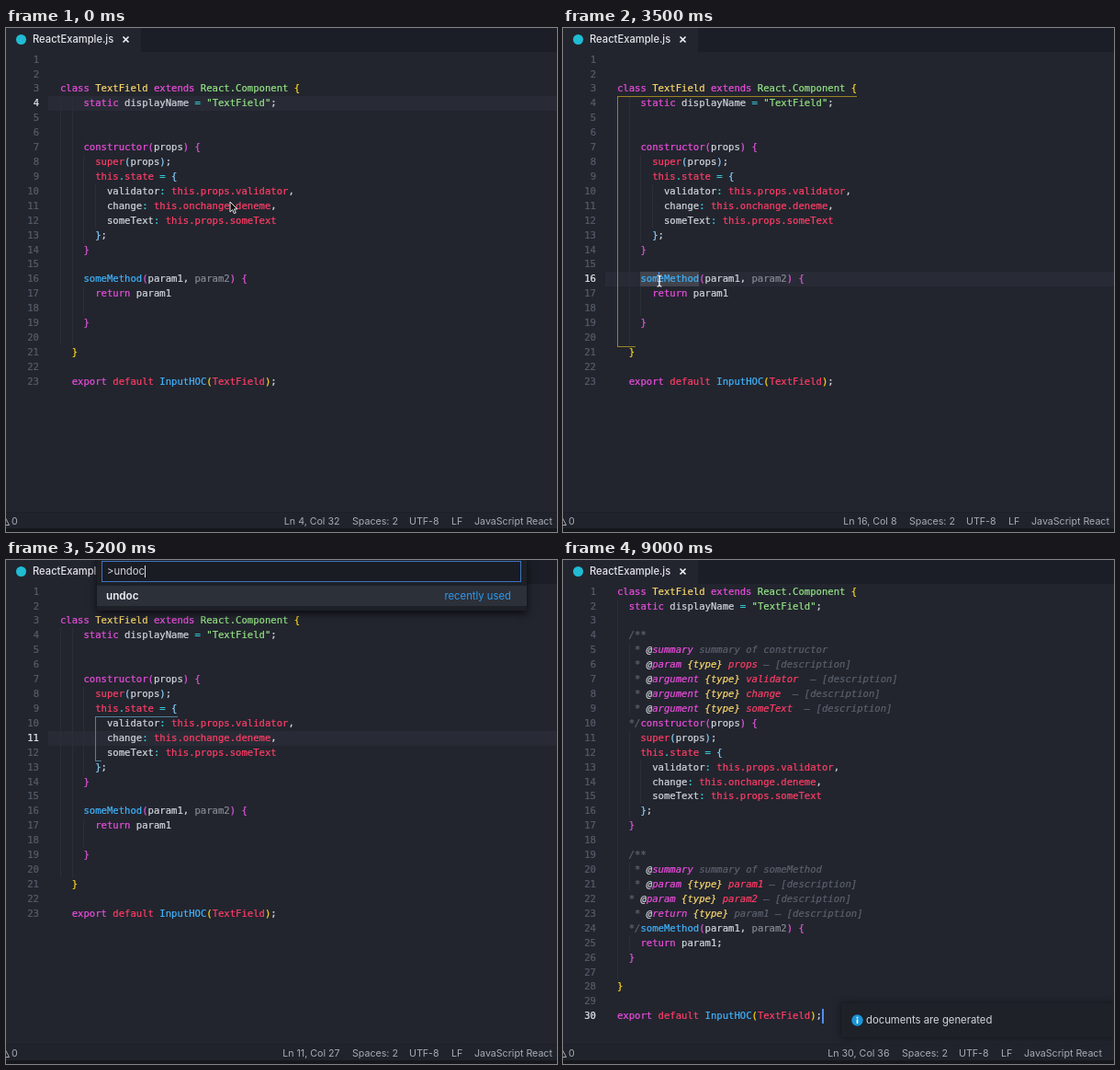
Recreate the animation shown at these times as an HTML page. Size 600 by 548 pixels, loop 9200 ms.

```html
<!DOCTYPE html>
<html lang="en">
<head>
<meta charset="utf-8">
<title>Editor</title>
<style>
html, body { margin: 0; width: 100%; height: 100%; overflow: hidden; background: #22252e; }
#stage { position: absolute; left: 0; top: 0; width: 600px; height: 548px; overflow: hidden; background: #22252e;
  font: 11.3px Inter, Roboto, sans-serif; color: #d3d6dd; }
#stage div, #stage svg, .ui { position: absolute; white-space: pre; }
.ui { top: 0; }
#tabs { left: 0; top: 0; width: 600px; height: 26px; background: #1b1e26; }
#tab { left: 0; top: 0; width: 147px; height: 26px; background: #22252e; font-weight: 500; color: #e4e6ea; }
#tab span { position: absolute; left: 29px; top: 0; line-height: 25px; font-size: 11.2px; }
#logo { left: 11px; top: 7px; width: 11px; height: 11px; border-radius: 50%; background: #20bcd4; }
.page { left: 0; top: 0; width: 600px; height: 526px; }
.row { left: 59px; height: 15.92px; line-height: 15.92px; -webkit-text-stroke: .22px;
  font-family: "DejaVu Sans Mono", "Noto Sans Mono", monospace; font-size: 10.58px; }
.num { right: 100%; margin-right: 23px; color: #565c69; }
.num.on { color: #e6e8ec; }
.guide { width: 1px; background: #2a2e37; }
.m { color: #ea4ddd; } .r { color: #ff3d66; } .b { color: #40b2fb; } .y { color: #f9d66c; }
.g { color: #93e283; } .c { color: #35cfe0; } .w { color: #d0d4dc; } .u { color: #858a95; }
.k, .M, .R, .Y, .W { font-style: italic; }
.k { color: #5b606c; } .M { color: #ea4ddd; } .R { color: #ff3d66; } .Y { color: #f9d66c; } .W { color: #d0d4dc; }
.b1 { color: #ffd71a; } .b2 { color: #e054d8; } .b3 { color: #87cefa; }
.plain .b1, .plain .b2, .plain .b3, .plain .u { color: #d0d4dc; }
#band { left: 46px; width: 554px; height: 16px; background: #282b35; }
.mark { height: 16px; background: #41444d; }
.scope { border: 1px solid; border-right: 0; border-top: 0; box-sizing: border-box; }
.scope i { position: absolute; left: -1px; top: 0; height: 1px; background: currentColor; }
#gold { left: 59px; top: 74px; width: 20px; height: 273px; color: #9a8322; }
#gold i { width: 261px; }
#sky { left: 97px; top: 170px; width: 7px; height: 49px; color: #567f9b; }
#sky i { width: 90px; }
#caret { width: 1.6px; height: 16px; background: #528bff; }
#status { left: 0; top: 526px; width: 600px; height: 18px; background: #20232b; border-top: 1px solid #1d2027;
  box-sizing: border-box; color: #a6abb6; font-size: 10.65px; line-height: 19px; }
#edge { left: 0; top: 544px; width: 600px; height: 4px; background: #15171c; }
#shift { left: 0; top: 0; width: 600px; height: 18px; }
#pos { right: 236.5px; }
#palette { left: 99px; top: -4px; width: 468px; height: 59px; background: #1d2027; box-shadow: 0 3px 8px #0b0c10; }
#field { left: 5px; top: 5px; width: 457px; height: 23px; box-sizing: border-box; border: 1px solid #3e73bd;
  background: #1a1c23; line-height: 21px; padding-left: 5px; }
#field b { display: inline-block; width: 1px; height: 13px; background: #dfe2e8; vertical-align: -2.5px; }
#hit { left: 0; top: 32px; width: 468px; height: 22px; line-height: 22px; background: #2c3039; }
#hit b { position: absolute; left: 10px; font-size: 11.7px; font-weight: 600; color: #eef0f3; }
#hit span { position: absolute; right: 17px; color: #2e9aee; }
#toast { left: 303px; top: 482px; width: 297px; height: 37px; line-height: 37px; background: #1e2128;
  box-shadow: 0 0 7px #101217; }
#toast svg { left: 11px; top: 12px; }
#toast span { left: 27px; }
</style>
</head>
<body>
<div id="stage">
  <div id="band"></div>
  <div id="word" class="mark"></div>
  <div class="page" id="before"></div>
  <div class="page" id="after"></div>
  <div id="gold" class="scope"><i></i></div>
  <div id="sky" class="scope"><i></i></div>
  <div id="caret"></div>
  <div id="tabs"><div id="tab"><div id="logo"></div><span>ReactExample.js</span>
    <svg style="left:126px;top:8px" width="9" height="9"><path d="M1.5 1.5l6 6m0-6l-6 6" stroke="#f0f1f3" stroke-width="1.7"/></svg>
  </div></div>
  <div id="toast">
    <svg width="13" height="13"><circle cx="6.5" cy="6.5" r="6.2" fill="#1a94d8"/><path d="M6.5 5.4v4.6M6.5 2.8v1.6" stroke="#fff" stroke-width="1.6"/></svg>
    <span class="ui">documents are generated</span>
  </div>
  <div id="status">
    <svg style="left:-5px;top:4px" width="10" height="11"><path d="M4 1L8.5 9.5H-1" fill="none" stroke="#a6abb6"/></svg>
    <span class="ui" style="left:6px">0</span>
    <div id="shift">
      <span class="ui" id="pos"></span>
      <span class="ui" style="left:377px">Spaces: 2</span>
      <span class="ui" style="left:439px">UTF-8</span>
      <span class="ui" style="left:485px">LF</span>
      <span class="ui" style="left:510px">JavaScript React</span>
    </div>
  </div>
  <div id="edge"></div>
  <div id="palette"><div id="field"><span id="typed"></span><b></b></div><div id="hit"><b>undoc</b><span>recently used</span></div></div>
  <svg id="arrow" width="11" height="16"><path d="M1 1v11l2.6-2.4 1.8 4.1 1.9-.8-1.8-4h3.4z" fill="#111" stroke="#e8e8e8" stroke-width="1"/></svg>
  <svg id="beam" width="8" height="14"><path d="M1.5 1q2.5 0 2.5 2v8q0 2-2.5 2M6.5 1q-2.5 0-2.5 2v8q0 2 2.5 2M2.5 7.5h3" fill="none" stroke="#eee" stroke-width="1.2"/></svg>
  <svg id="hand" width="12" height="13"><path d="M3 1.5q1-1 1.8.4l.9 2.6 4.2 1q1 .4.8 1.8l-.5 2.4-.8 2h-4.2l-3.4-3.7q-.6-1.3 1-1l1 .6z" fill="#f2f2f2" stroke="#222" stroke-width=".8"/></svg>
</div>
<script>
const $ = id => document.getElementById(id);
const LOOP = 9200, CH = 6.37, LH = 15.92, X0 = 59, Y0 = 26.6;
const colX = c => X0 + c * CH;
const rowY = n => Y0 + (n - 1) * LH;

// "~x" starts a run in colour class x; each line is [indent, runs]
const tail = "~k – [description]";
const tag = (name, type, rest) => `~k* ~W@~M${name} ~Y${type}${rest}`;
const ctor = "~mconstructor~2(~wprops~2) {";
const state = [
  "~rsuper~3(~wprops~3)~w;",
  "~rthis~c.~rstate ~c= ~3{",
  "~wvalidator~c: ~rthis.props.validator~w,",
  "~wchange~c: ~rthis.onchange.deneme~w,",
  "~wsomeText~c: ~rthis.props.someText",
  "~3}~w;"
];
const method = "~bsomeMethod~2(~wparam1, ~uparam2~2) {";
const head = "~mclass ~yTextField ~mextends ~gReact.Component ~1{";
const field = '~mstatic ~wdisplayName ~c= ~g"TextField"~w;';
const foot = "~mexport ~rdefault ~bInputHOC~1(~rTextField~1)~w;";

const before = {
  3: [0, head], 4: [4, field], 7: [4, ctor],
  8: [6, state[0]], 9: [6, state[1]], 10: [8, state[2]], 11: [8, state[3]], 12: [8, state[4]], 13: [6, state[5]],
  14: [4, "~2}"], 16: [4, method], 17: [6, "~mreturn ~wparam1"], 19: [4, "~2}"], 21: [2, "~1}"], 23: [2, foot]
};
const after = {
  1: [0, head], 2: [2, field], 4: [2, "~k/**"],
  5: [3, tag("summary", "", "~ksummary of constructor")],
  6: [3, tag("param", "{type}", " ~Rprops" + tail)],
  7: [3, tag("argument", "{type}", " ~Rvalidator " + tail)],
  8: [3, tag("argument", "{type}", " ~Rchange " + tail)],
  9: [3, tag("argument", "{type}", " ~RsomeText " + tail)],
  10: [2, "~k*/" + ctor],
  11: [4, state[0]], 12: [4, state[1]], 13: [6, state[2]], 14: [6, state[3]], 15: [6, state[4]], 16: [4, state[5]],
  17: [2, "~2}"], 19: [2, "~k/**"],
  20: [3, tag("summary", "", "~ksummary of someMethod")],
  21: [3, tag("param", "{type}", " ~Rparam1" + tail)],
  22: [2, tag("param", "{type}", " ~Rparam2" + tail)],
  23: [3, tag("return", "{type}", "~k param1" + tail)],
  24: [2, "~k*/" + method], 25: [4, "~mreturn ~wparam1;"], 26: [2, "~2}"], 28: [0, "~1}"], 30: [0, foot]
};

function add(parent, cls, css, text = "") {
  const el = document.createElement("div");
  el.className = cls;
  el.style.cssText = css;
  el.textContent = text;
  parent.append(el);
  return el;
}

function build(page, code, count, guides) {
  for (const [col, from, to] of guides)
    add(page, "guide", `left:${colX(col)}px;top:${rowY(from)}px;height:${(to - from + 1) * LH}px`);
  const nums = [];
  for (let n = 1; n <= count; n++) {
    const row = add(page, "row", `top:${rowY(n)}px`);
    nums[n] = add(row, "num", "", n);
    const [indent, text] = code[n] || [0, ""];
    row.append(" ".repeat(indent));
    for (const run of text.split("~").slice(1)) {
      const span = document.createElement("span");
      span.className = run[0] > "0" && run[0] < "4" ? "b" + run[0] : run[0];
      span.textContent = run.slice(1);
      row.append(span);
    }
  }
  return nums;
}
const numsA = build($("before"), before, 23, [[0, 4, 20], [2, 4, 20], [4, 8, 13], [4, 17, 18], [6, 10, 12]]);
const numsB = build($("after"), after, 30, [[0, 2, 27], [2, 5, 9], [2, 11, 16], [4, 13, 15], [2, 20, 21], [2, 25, 25]]);

// start, line, column, status suffix, marked columns, scope, band
const poses = [
  [0, 4, 32, "", null, "", true],
  [1200, 7, 11, "", [4, 15], "gold", true],
  [2300, 9, 21, " (14 selected)", [6, 20], "sky", false],
  [3400, 16, 8, "", [4, 14], "gold", true],
  [4200, 11, 27, "", null, "sky", true],
  [6000, 30, 36, "", null, "", false]
];
const path = [
  [0, 244, 189], [100, 244, 189], [600, 165, 120], [1000, 165, 120], [1400, 114, 139], [2000, 114, 139],
  [2300, 100, 163], [2600, 184, 163], [2900, 86, 274], [3300, 105, 275], [3600, 105, 275], [4200, 227, 197],
  [4500, 227, 197], [5100, 195, 191], [5200, 195, 191]
];
const keys = [[4700, "u"], [4800, "n"], [4900, "d"], [5000, "o"], [5100, "c"]];
const blinks = [[6500, 7000], [7500, 8000], [8500, 8950]];

const show = (id, on) => { $(id).style.display = on ? "block" : "none"; };
const place = (id, x, y) => { $(id).style.left = x + "px"; $(id).style.top = y + "px"; };

function pointAt(t) {
  const i = path.findIndex(p => p[0] > t);
  if (i < 0) return path[path.length - 1].slice(1);
  const [a, x, y] = path[i - 1], [b, u, v] = path[i];
  const k = (t - a) / (b - a), e = k * k * (3 - 2 * k);
  return [x + (u - x) * e, y + (v - y) * e];
}

function draw(time) {
  const t = time % LOOP;
  const [, line, col, note, mark, scope, band] = poses.filter(p => p[0] <= t).pop();
  const done = t >= 6000;

  show("before", !done);
  show("after", done);
  $("after").classList.toggle("plain", t < 6400);
  for (const nums of [numsA, numsB])
    nums.forEach((el, n) => el.classList.toggle("on", n === line));

  show("band", band);
  place("band", 46, rowY(line));
  show("word", mark);
  if (mark) {
    place("word", colX(mark[0]), rowY(line));
    $("word").style.width = (mark[1] - mark[0]) * CH + "px";
  }
  show("gold", scope === "gold");
  show("sky", scope === "sky");

  const lit = line === 7 || line === 16 || done && !blinks.some(([a, b]) => t >= a && t < b);
  show("caret", lit);
  place("caret", colX(col - 1), rowY(line));

  $("pos").textContent = `Ln ${line}, Col ${col}${note}`;
  $("shift").style.left = done ? "-8px" : "0";

  show("palette", t >= 4600 && t < 5500);
  $("typed").textContent = ">" + keys.filter(k => k[0] <= t).map(k => k[1]).join("");

  show("toast", done);
  const left = 1 - Math.min(1, Math.max(0, (t - 6000) / 300));
  place("toast", 303, 482 + 25 * left ** 3);

  const [x, y] = pointAt(t);
  const kind = t < 1000 ? "arrow" : t < 4200 ? "beam" : t < 4600 ? "hand" : t < 5200 ? "beam" : "";
  for (const id of ["arrow", "beam", "hand"]) show(id, id === kind);
  if (kind === "arrow") place(kind, x - 1, y - 1);
  if (kind === "beam") place(kind, x - 4, y - 7);
  if (kind === "hand") place(kind, x - 6, y - 6);
}

const start = performance.now();
function tick() {
  draw(performance.now() - start);
  requestAnimationFrame(tick);
}
tick();
</script>
</body>
</html>
```
